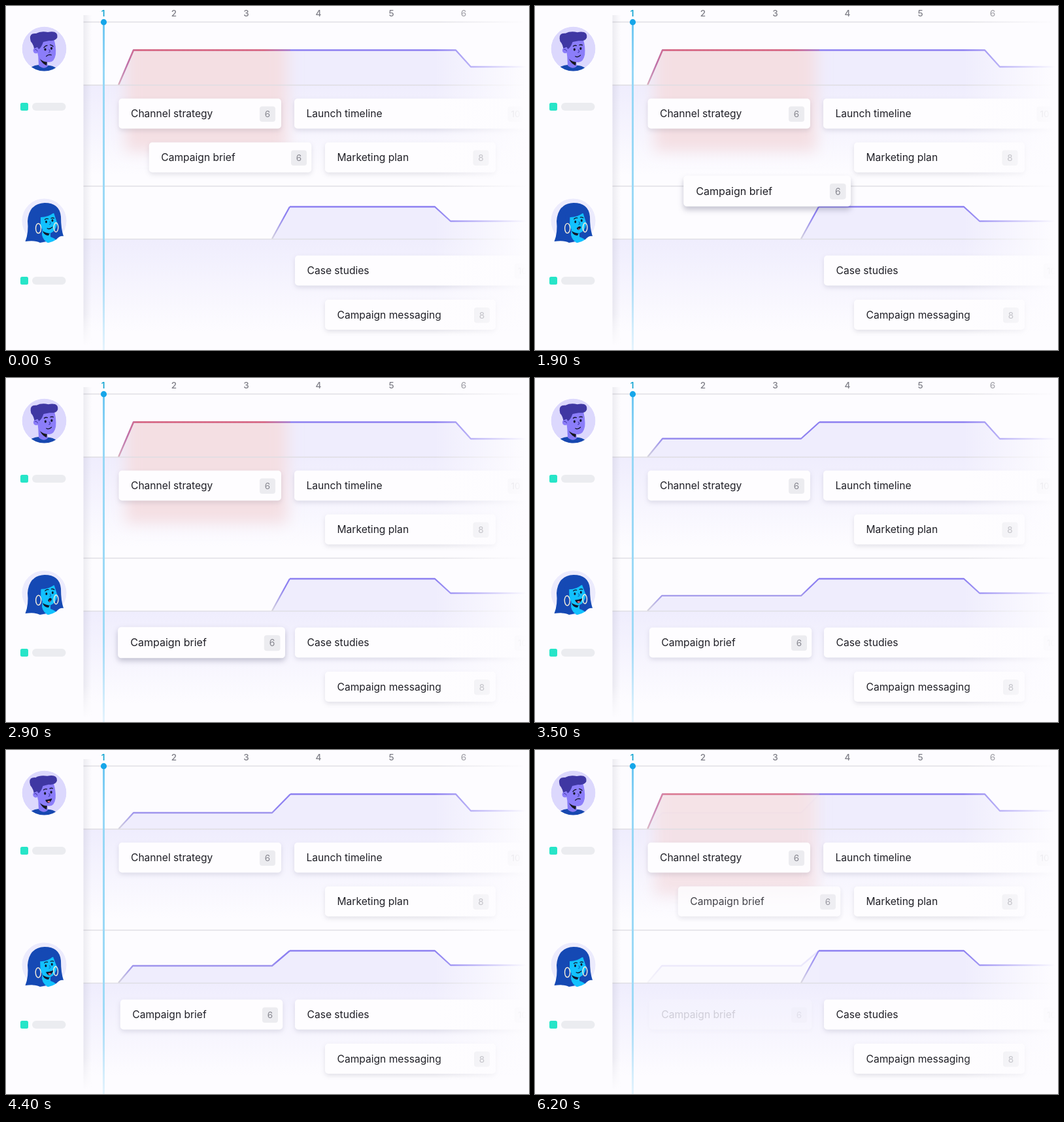
Animation, 800 px wide and 526 px high, one loop 6.3 s. Source, as an HTML page:

```html
<!DOCTYPE html>
<html lang="en">
<head>
<meta charset="utf-8">
<title>Workload timeline</title>
<style>
html, body { margin: 0; width: 100%; height: 100%; overflow: hidden; background: #fdfcff; }
svg { display: block; width: 100vw; height: 100vh; }
text { font-family: Inter, "Liberation Sans", sans-serif; }
.name { font-size: 15.6px; fill: #1f1f26; }
.num { font-size: 13.5px; fill: #86868f; text-anchor: middle; }
.day { font-size: 13.5px; font-weight: 500; fill: #7e7e87; text-anchor: middle; }
.card { filter: drop-shadow(0 3px 3.5px rgba(45, 45, 80, .13)); }
.rule { stroke: #dfdee4; stroke-width: 1.6; }
.line { fill: none; stroke-width: 2.3; stroke-linejoin: round; }
.ink { fill: none; stroke: #14162a; stroke-width: 1.3; stroke-linecap: round; }
</style>
</head>
<body>
<svg viewBox="0 0 800 526" xmlns="http://www.w3.org/2000/svg">
  <defs>
    <linearGradient id="row1" x1="0" x2="0" y1="121" y2="258" gradientUnits="userSpaceOnUse">
      <stop stop-color="#efedfd"/><stop offset="1" stop-color="#fdfcff"/>
    </linearGradient>
    <linearGradient id="row2" x1="0" x2="0" y1="356" y2="498" gradientUnits="userSpaceOnUse">
      <stop stop-color="#efedfd"/><stop offset="1" stop-color="#fdfcff"/>
    </linearGradient>
    <linearGradient id="ink1" x1="0" x2="0" y1="121" y2="88" gradientUnits="userSpaceOnUse">
      <stop stop-color="#d6d4de"/><stop offset="1" stop-color="#8d80f1"/>
    </linearGradient>
    <linearGradient id="ink2" x1="0" x2="0" y1="356" y2="322" gradientUnits="userSpaceOnUse">
      <stop stop-color="#d6d4de"/><stop offset="1" stop-color="#8d80f1"/>
    </linearGradient>
    <linearGradient id="hot" x1="172" x2="450" y1="0" y2="0" gradientUnits="userSpaceOnUse">
      <stop stop-color="#e0697b" stop-opacity=".35"/><stop offset=".11" stop-color="#e0697b"/>
      <stop offset=".8" stop-color="#e0697b"/><stop offset="1" stop-color="#e0697b" stop-opacity="0"/>
    </linearGradient>
    <linearGradient id="fade" x1="655" x2="796" y1="0" y2="0" gradientUnits="userSpaceOnUse">
      <stop stop-color="#fdfcff" stop-opacity="0"/><stop offset="1" stop-color="#fdfcff"/>
    </linearGradient>
    <linearGradient id="edge" x1="118" x2="131" y1="0" y2="0" gradientUnits="userSpaceOnUse">
      <stop stop-color="#3c3c5a" stop-opacity=".09"/><stop offset="1" stop-color="#3c3c5a" stop-opacity="0"/>
    </linearGradient>
    <linearGradient id="foot" x1="0" x2="0" y1="470" y2="520" gradientUnits="userSpaceOnUse">
      <stop stop-color="#fdfcff" stop-opacity="0"/><stop offset="1" stop-color="#fdfcff"/>
    </linearGradient>
    <linearGradient id="now" x1="0" x2="0" y1="24" y2="526" gradientUnits="userSpaceOnUse">
      <stop stop-color="#6cc6f2"/><stop offset=".15" stop-color="#96d7f6"/>
      <stop offset=".75" stop-color="#9edaf7"/><stop offset="1" stop-color="#9edaf7" stop-opacity=".25"/>
    </linearGradient>
    <filter id="soft" x="-30%" y="-30%" width="160%" height="160%"><feGaussianBlur stdDeviation="11"/></filter>
    <clipPath id="disc1"><circle cx="58.5" cy="65.5" r="34"/></clipPath>
    <clipPath id="disc2"><circle cx="58.5" cy="328.5" r="34"/></clipPath>
  </defs>

  <rect width="800" height="526" fill="#fdfcff"/>
  <rect x="118" y="121" width="682" height="154" fill="url(#row1)"/>
  <rect x="118" y="356" width="682" height="170" fill="url(#row2)"/>
  <g id="charts"></g>
  <path class="rule" d="M118 24.5H800M118 121H800M118 275.5H800M118 356.5H800"/>
  <g id="tail"></g>
  <g id="days"></g>
  <g id="cards"></g>
  <rect x="655" width="145" height="526" fill="url(#fade)"/>
  <g id="drag"></g>

  <rect width="118.5" height="526" fill="#fdfcff"/>
  <rect x="118.5" y="14" width="13" height="506" fill="url(#edge)"/>
  <rect x="118" y="470" width="14" height="56" fill="url(#foot)"/>
  <rect x="148" y="24" width="3" height="502" fill="url(#now)"/>
  <circle cx="149.5" cy="24.7" r="4.6" fill="#16a6e9"/>
  <text class="day" x="148.5" y="16" style="fill:#16a6d2;font-weight:600">1</text>
  <g id="tags"></g>

  <g clip-path="url(#disc1)">
    <circle cx="58.5" cy="65.5" r="34" fill="#dcd8fd"/>
    <path d="M34 100Q37 91 50 90L67 91Q76 92 81 100Z" fill="#1748b0"/>
    <path d="M49 70L50 91Q58 98 64 92L62 80Z" fill="#8478f5"/>
    <path d="M52 81Q57 86 63 85L62 91Q55 88 52 81Z" fill="#17171f"/>
    <g id="head1">
      <path d="M46 56L73 50Q77 62 76 74Q74 86 66 86Q56 86 49 76Z" fill="#8b7df9"/>
      <circle cx="46" cy="68" r="4.5" fill="#8b7df9"/>
      <path d="M44 67Q46 65 48 69" class="ink" style="stroke:#3f37a3;stroke-width:1"/>
      <path d="M37 50Q36 41 46 42Q53 38 64 40Q80 37 78.500 48Q76 54 66 53L57 55Q54 64 50 66L48 63L43 65Q42 60 40 57Q37 54 37 50Z" fill="#3f37a3"/>
      <path id="brow1" class="ink"/>
      <ellipse cx="60" cy="66.500" rx="1.6" ry="2.100" fill="#14162a"/>
      <ellipse cx="69.500" cy="64.800" rx="1.6" ry="2.100" fill="#14162a"/>
      <path class="ink" style="stroke:#4a3fb5" d="M66 67Q69 70 65.500 71"/>
      <g id="mouth1"></g>
    </g>
  </g>

  <circle cx="58.5" cy="328.5" r="34" fill="#ecebfd"/>
  <path d="M29.500 360Q35 346 33 329Q35 302 59 301Q82 301 84 322Q84 341 88 352Q82 351 77 357L52 362Q45 358 29.500 360Z" fill="#1549b4"/>
  <g clip-path="url(#disc2)">
    <path d="M56 338L55 350Q57 360 68 364L82 364Q78 356 68 353L68 340Z" fill="#12c1ff"/>
    <path d="M56 344Q61 348 67 347L65 351Q58 351 56 344Z" fill="#10162c"/>
  </g>
  <g id="head2">
    <path d="M53 322L76 316Q80 330 77 338Q73 347.500 65 347.500Q56 346 53 336Z" fill="#12c1ff"/>
    <path d="M49 339L53 323Q65 323 73 316L78 331Q85 318 70 307Q50 304 46 322Z" fill="#1549b4"/>
    <path id="brow2" class="ink"/>
    <ellipse cx="61.500" cy="330" rx="1.5" ry="2" fill="#10162c"/>
    <ellipse cx="71" cy="328" rx="1.5" ry="2" fill="#10162c"/>
    <path class="ink" style="stroke:#0b78c8" d="M67 330Q70 333 66.500 334"/>
    <g id="mouth2"></g>
    <g fill="none" stroke="#f4edd9" stroke-width="1.4">
      <ellipse cx="49.500" cy="340" rx="4" ry="7.500"/>
      <ellipse cx="76.500" cy="338.500" rx="3.300" ry="7"/>
    </g>
  </g>
</svg>
<script>
const LOOP = 6300;
const $ = id => document.getElementById(id);
const clamp = v => Math.min(1, Math.max(0, v));
const span = (t, a, b) => clamp((t - a) / (b - a));
const ease = p => p < .5 ? 4 * p ** 3 : 1 - 4 * (1 - p) ** 3;
const mix = (a, b, p) => a + (b - a) * p;
const path = pts => 'M' + pts.map(p => p.join(' ')).join('L');

// Blend between poses; each key is [start, end, pose]
function pose(t, first, keys) {
  return keys.reduce((cur, [a, b, to]) => {
    const p = ease(span(t, a, b));
    return cur.map((v, i) => mix(v, to[i], p));
  }, first);
}

function face(x, y, w, h, label, num, numX) {
  const cy = y + h / 2;
  return `<rect x="${x}" y="${y}" width="${w}" height="${h}" rx="5" fill="#fefdff"/>
    <text class="name" x="${x + 18.5}" y="${cy + 5.7}">${label}</text>
    <rect x="${numX - 12}" y="${cy - 11}" width="24" height="23.5" rx="4" fill="#ececf0"/>
    <text class="num" x="${numX}" y="${cy + 5.7}">${num}</text>`;
}
const card = (...a) => `<g class="card">${face(...a)}</g>`;

$('cards').innerHTML =
  card(172.5, 141.5, 248.5, 46, 'Channel strategy', 6, 400) +
  card(441, 141.5, 375, 46, 'Launch timeline', 10, 779.5) +
  card(488, 208.5, 261, 46, 'Marketing plan', 8, 726.5) +
  card(442, 381.5, 375, 46, 'Case studies', 10, 790) +
  card(488, 449, 261, 46, 'Campaign messaging', 8, 728);

const brief = face(-124.2, -23, 248.5, 46, 'Campaign brief', 6, 105);
$('drag').innerHTML = `<g id="live">${brief}</g><g id="rest">${brief}</g>`;

$('days').innerHTML = [257, 367.5, 478, 589.5, 700]
  .map((x, i) => `<text class="day" x="${x}" y="16">${i + 2}</text>`).join('');

$('tags').innerHTML = [148, 414].map(y =>
  `<rect x="22" y="${y}" width="12" height="12" rx="2.5" fill="#27e5c8"/>
   <rect x="40" y="${y}" width="51.5" height="12" rx="6" fill="#ebecf0"/>`).join('');

// Right-hand part of both load curves never moves
const top1 = [[435, 67.5], [688, 67.5], [711, 93], [800, 93]];
const top2 = [[434, 307], [656, 307], [680, 329], [800, 329]];
const area = (pts, base) =>
  path([[pts[0][0], base], ...pts, [pts[pts.length - 1][0], base]]) + 'Z';

const layer = k => `<g id="chart${k}">
  <clipPath id="under${k}"><path id="hull${k}"/></clipPath>
  <path id="fillA${k}" fill="#efedfd"/><path id="fillB${k}" fill="#efedfd"/>
  <g clip-path="url(#under${k})"><rect id="glow${k}" x="183" y="30" width="247" height="192"
    fill="#f4dfe3" filter="url(#soft)"/></g>
  <path id="lineA${k}" class="line" stroke="url(#ink1)"/>
  <path id="red${k}" class="line" stroke="url(#hot)"/>
  <path id="lineB${k}" class="line" stroke="url(#ink2)"/></g>`;
$('charts').innerHTML =
  `<path d="${area(top1, 121)}" fill="#efedfd"/><path d="${area(top2, 356)}" fill="#efedfd"/>` +
  layer(0) + layer(1);
$('tail').innerHTML = [top1, top2]
  .map(p => `<path class="line" stroke="#8d80f1" d="${path(p)}"/>`).join('');

function drawChart(k, shift, heat, alpha) {
  const y1 = mix(67.5, 96, shift), y2 = mix(356, 330, shift);
  const a = [[172, 121], [195, y1], [407, y1], top1[0]];
  const ramp = [[407, y2], top2[0]];
  const b = shift > .02 ? [[172, 356], [194, y2], ...ramp] : ramp;
  const set = (id, d) => $(id + k).setAttribute('d', d);
  set('fillA', area(a, 121));
  set('fillB', area(b, 356));
  set('lineA', path(a));
  set('red', path(a));
  set('lineB', path(b));
  set('hull', path([[118, 121], ...a, [480, 67.5], [480, 275], [118, 275]]) + 'Z');
  $('glow' + k).setAttribute('opacity', heat);
  $('red' + k).setAttribute('opacity', heat);
  $('chart' + k).setAttribute('opacity', alpha);
}

function placeCard(id, x, y, lift, alpha) {
  const g = $(id);
  g.setAttribute('transform', `translate(${x} ${y}) scale(${1 + .03 * lift})`);
  g.setAttribute('opacity', alpha);
  g.style.filter = `drop-shadow(0 ${mix(3, 5, lift)}px ${mix(3.5, 4, lift)}px rgba(45,45,80,${mix(.13, .27, lift)}))`;
}

// Mouth: half width, upper bend, lower bend, openness
function mouth(id, x, y, w, up, low, open) {
  const bend = c => `Q${x} ${y + c}`;
  $(id).innerHTML =
    `<path d="M${x - w} ${y + 1}${bend(up)} ${x + w} ${y - 1}${bend(low)} ${x - w} ${y + 1}Z"
      fill="#14162a" stroke="#14162a" stroke-width="1.1" stroke-linejoin="round"/>
     <ellipse cx="${x}" cy="${y + low * .36}" rx="${w * .45}" ry="1.2" fill="#f0768a" opacity="${open}"/>`;
}

function brows(id, x, y, lift, tilt) {
  $(id).setAttribute('d',
    `M${x - 7} ${y + 1 + tilt - lift}Q${x - 5} ${y - 1 - lift} ${x - 2} ${y - tilt - lift}` +
    `M${x + 2.5} ${y - 1 - tilt - lift}Q${x + 5} ${y - 2 - lift} ${x + 7} ${y - 1 + tilt - lift}`);
}

// Pose: half width, upper, lower, open, brow lift, brow tilt, head turn
const sad = [4, -3, -2.6, 0, 0, 1.2, 0];
const calm = [4, 3, 3.4, 0, 1, 0, 1];
const glad = [4.5, .5, 9, 1, 1.5, 0, -1];
const smile = [4, 3, 3.4, 0, 0, 0, 0];
const gasp = [2.4, -4.5, 6, .7, 1.5, .5, 1];
const beam = [5, .5, 10, 1, 1, 0, -2];

function drawFaces(t) {
  const m = pose(t, sad, [[1500, 2000, calm], [3700, 4200, glad], [5750, 6150, sad]]);
  const w = pose(t, smile, [[1600, 2100, gasp], [3000, 3450, beam], [5750, 6150, smile]]);
  mouth('mouth1', 65.5, 76, ...m.slice(0, 4));
  brows('brow1', 65, 61.5, m[4], m[5]);
  $('head1').setAttribute('transform', `rotate(${m[6]} 56 86)`);
  mouth('mouth2', 67, 339, ...w.slice(0, 4));
  brows('brow2', 66.5, 325.5, w[4], w[5]);
  $('head2').setAttribute('transform', `rotate(${w[6]} 62 348)`);
}

function draw(t) {
  const back = span(t, 5700, 6300);
  const shift = ease(span(t, 3000, 3720));
  const heat = 1 - span(t, 2900, 3400);
  drawChart(0, shift, heat, 1 - back);
  drawChart(1, 0, 1, back);

  const lift = ease(span(t, 650, 1200)) - ease(span(t, 2850, 3350));
  const p = ease(span(t, 1400, 2590));
  placeCard('live', 343 + 49 * p - 93 * p ** 3, 231.5 + 173 * p, lift, 1 - back);
  placeCard('rest', 343, 231.5, 0, back);
  drawFaces(t);
}

// The motion runs at ten pictures a second
function tick(now) {
  draw(Math.floor((now % LOOP) / 100) * 100);
  requestAnimationFrame(tick);
}
draw(0);
requestAnimationFrame(tick);
</script>
</body>
</html>
```
